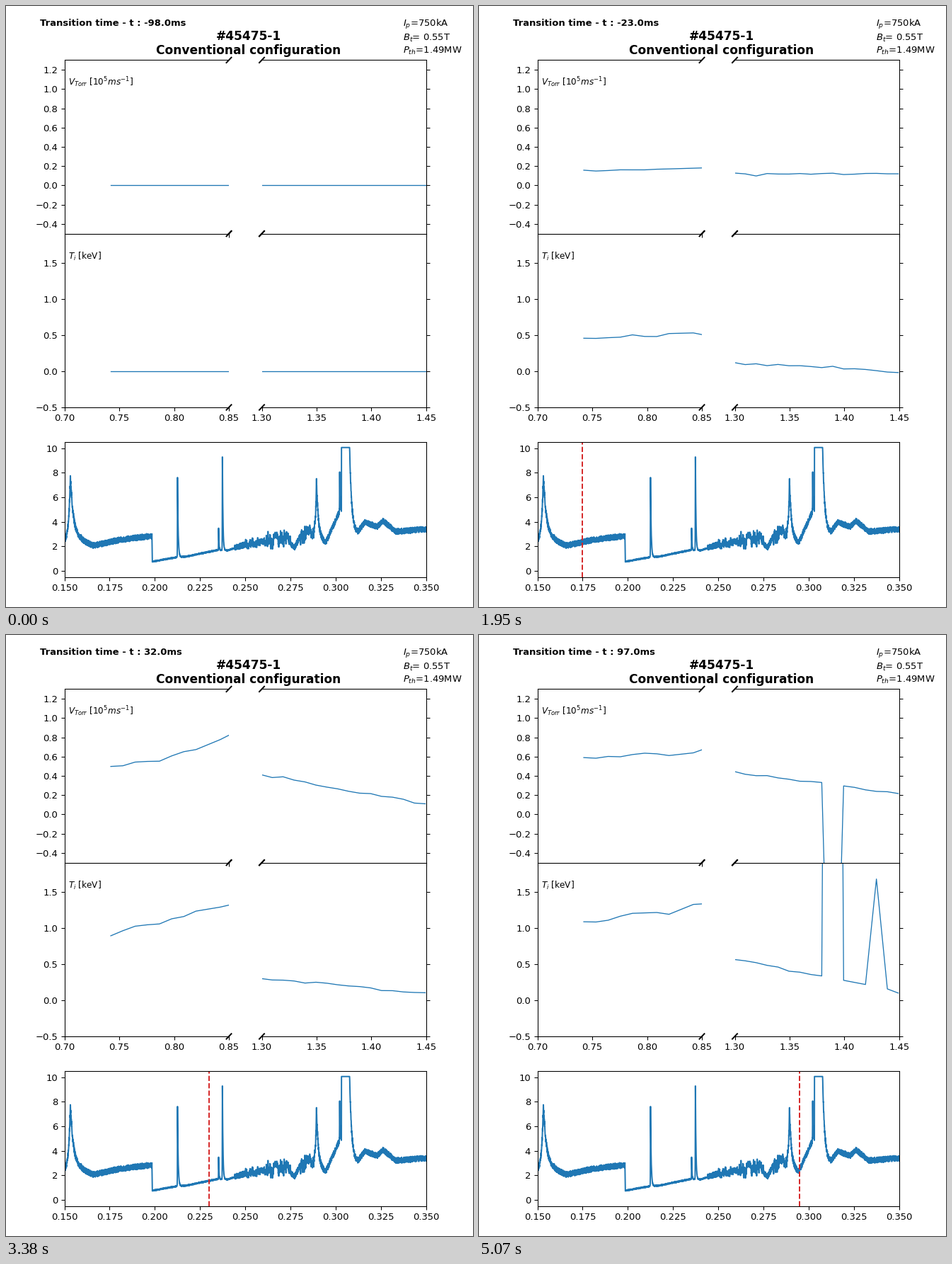
Animation, 660 px wide and 849 px high, one loop 5200 ms. Source, as a matplotlib script:

```python
import numpy as np
import matplotlib.pyplot as plt
from matplotlib.animation import FuncAnimation
from matplotlib.ticker import MultipleLocator

W, H, DPI = 660, 849, 96
PT = 94.3 / DPI  # the layout is scaled slightly below nominal points
FRAMES, STEP_MS = 40, 130
FIRST_DATA = 11
BLUE, RED = "tab:blue", "tab:red"

plt.rcParams.update({"font.family": "DejaVu Sans", "font.size": 10 * PT})
fig = plt.figure(figsize=(W / DPI, H / DPI), dpi=DPI, facecolor="white")

# Radial channels on both sides of the axis break.
X_IN = np.append(np.delete(0.7423 + 0.0111 * np.arange(10), 8), 0.8502)
X_OUT = np.append(1.3, 1.3095 + 0.00997 * np.arange(15))
S_IN = (X_IN - X_IN[0]) / np.ptp(X_IN)
S_OUT = (X_OUT - X_OUT[0]) / np.ptp(X_OUT)

# Evolution of each profile's ends: inner core and edge, outer start and end.
KEYS = [15, 23, 30, 34, 39]
VEL = dict(
    core=[0.155, 0.45, 0.56, 0.68, 0.60],
    edge=[0.185, 0.70, 0.97, 1.12, 0.67],
    start=[0.125, 0.40, 0.46, 0.415, 0.43],
    end=[0.12, 0.08, 0.14, 0.17, 0.22],
    bend=1.7, seed=100)
TEMP = dict(
    core=[0.46, 0.775, 1.09, 1.24, 1.08],
    edge=[0.53, 1.12, 1.60, 1.97, 1.32],
    start=[0.11, 0.29, 0.32, 0.40, 0.57],
    end=[0.0, 0.09, 0.11, 0.13, 0.12],
    bend=1.0, seed=500)

# Outer channels whose fit diverges: step, channel, velocity and temperature offset.
STRAYS = [(23, 13, 0.27, -0.42), (34, 15, -0.33, 1.5), (39, 9, -4, 25), (39, 13, 0, 1.5)]


def profile(p, i, stray_col):
    """Inner and outer channel values at step i."""
    if i < FIRST_DATA:
        return 0 * X_IN, 0 * X_OUT
    core, edge, start, end = (np.interp(i, KEYS, p[k]) for k in ("core", "edge", "start", "end"))
    rng = np.random.default_rng(p["seed"] + i)
    inner = core + (edge - core) * S_IN ** p["bend"]
    outer = start + (end - start) * S_OUT
    inner = inner * rng.normal(1, 0.02, inner.size)
    outer = outer + rng.normal(0, 0.01, outer.size)
    for stray in STRAYS:
        if stray[0] == i:
            outer[stray[1]] += stray[stray_col]
    return inner, outer


def pulse(t, peak, height, rise, decay):
    """Exponential rise up to the peak, exponential decay after it."""
    return height * np.exp(-np.where(t < peak, (peak - t) / rise, (t - peak) / decay))


def emission():
    """Emission trace over time in ms: drift, pulses, bursts and noise."""
    t = np.linspace(150, 350, 4000)
    rng = np.random.default_rng(7)
    drift = np.array([
        (150, 2.4), (159, 2.5), (166, 2.05), (180, 2.5), (198.4, 2.85), (198.6, 0.75),
        (212, 1.1), (217, 1.15), (235, 1.7), (240, 1.65), (250, 2.15), (262, 2.45),
        (273, 2.6), (277, 1.85), (281, 3.0), (288, 2.9), (294.5, 2.3), (302.9, 5.1),
        (308, 3.3), (312, 3.1), (316, 3.95), (323, 3.6), (326, 4.1), (333, 3.2), (350, 3.4)])
    y = np.interp(t, *drift.T)
    for args in ((153.3, 5.3, 0.9, 1.8), (212.5, 6.8, 0.04, 0.35), (235.2, 2, 0.04, 0.2),
                 (237.3, 8.2, 0.04, 0.3), (289.3, 4.7, 0.5, 1), (302.1, 3.8, 0.04, 0.2),
                 (307.6, 6.75, 0.01, 1.1)):
        y += pulse(t, *args)
    grid = np.arange(150, 351, 0.3)
    slow = np.interp(t, grid, rng.uniform(-1, 1, grid.size))
    for start, stop, amp in ((250, 262, 0.25), (262, 275, 0.65), (280.5, 288.5, 0.9)):
        y += amp * slow * ((t > start) & (t < stop))
    quiet = (t > 198.4) & (t < 244)
    y += rng.uniform(-1, 1, t.size) * np.where(quiet, 0.05, 0.24)
    y[(t > 303.1) & (t < 307.6)] = 10.05  # detector saturates
    return t / 1000, y


def label(x, y, text, **kw):
    """Text with its baseline at pixel (x, y) from the top left."""
    return fig.text(x / W, 1 - y / H, text, va="baseline", **kw)


def panel(x0, top, x1, bottom, xlim, ylim, xstep, ystep):
    ax = fig.add_axes([x0 / W, 1 - bottom / H, (x1 - x0) / W, (bottom - top) / H])
    ax.set(xlim=xlim, ylim=ylim)
    ax.xaxis.set_major_locator(MultipleLocator(xstep))
    ax.yaxis.set_major_locator(MultipleLocator(ystep))
    return ax


def broken_pair(top, bottom, ylim, ystep, show_x):
    """Two panels split by a broken x axis; returns their lines."""
    left = panel(82.5, top, 315, bottom, (0.70, 0.85), ylim, 0.05, ystep)
    right = panel(361.5, top, 594, bottom, (1.30, 1.45), ylim, 0.05, ystep)
    left.spines["right"].set_visible(False)
    right.spines["left"].set_visible(False)
    right.yaxis.tick_right()
    right.tick_params(labelright=False)
    d = 0.015
    for ax, edge in ((left, 1), (right, 0)):
        ax.tick_params(labelbottom=show_x)
        for y in (0, 1):
            ax.plot([edge - d, edge + d], [y - d, y + d], color="k", lw=1.5 * PT,
                    transform=ax.transAxes, clip_on=False)
    return [ax.plot(x, 0 * x, color=BLUE, lw=PT)[0] for ax, x in ((left, X_IN), (right, X_OUT))]


vel_lines = broken_pair(76.4, 321.6, (-0.5, 1.3), 0.2, False)
temp_lines = broken_pair(321.6, 567, (-0.5, 1.9), 0.5, True)

trace = panel(82.5, 615.9, 594, 806.5, (0.15, 0.35), (-0.5, 10.5), 0.025, 2)
trace.xaxis.set_major_formatter("{x:.3f}")
trace.plot(*emission(), color=BLUE, lw=1.5 * PT)
cursor = trace.axvline(0.15, color=RED, ls="--", lw=1.5 * PT)

clock = label(48, 28, "", weight="bold")
for y, text in ((48, "#45475-1"), (67.7, "Conventional configuration")):
    label(343, y, text, ha="center", weight="bold", size=13 * PT)
for y, text in ((29, "$I_p$=750kA"), (49, "$B_t$= 0.55T"), (67, "$P_{th}$=1.49MW")):
    label(561, y, text)
for y, text in ((112, "$V_{Torr}$ [$10^5ms^{-1}$]"), (357.5, "$T_i$ [keV]")):
    label(88, y, text, size=9)


def update(i):
    clock.set_text(f"Transition time - t : {-98 + 5 * i:.1f}ms")
    for lines, params, col in ((vel_lines, VEL, 2), (temp_lines, TEMP, 3)):
        for line, values in zip(lines, profile(params, i, col)):
            line.set_ydata(values)
    now = 0.1 + 0.005 * i
    cursor.set_xdata([now, now])
    cursor.set_visible(i >= FIRST_DATA)
    return [clock, cursor, *vel_lines, *temp_lines]


anim = FuncAnimation(fig, update, frames=FRAMES, interval=STEP_MS,
                     repeat=True, repeat_delay=0, blit=False)
plt.show()
```
